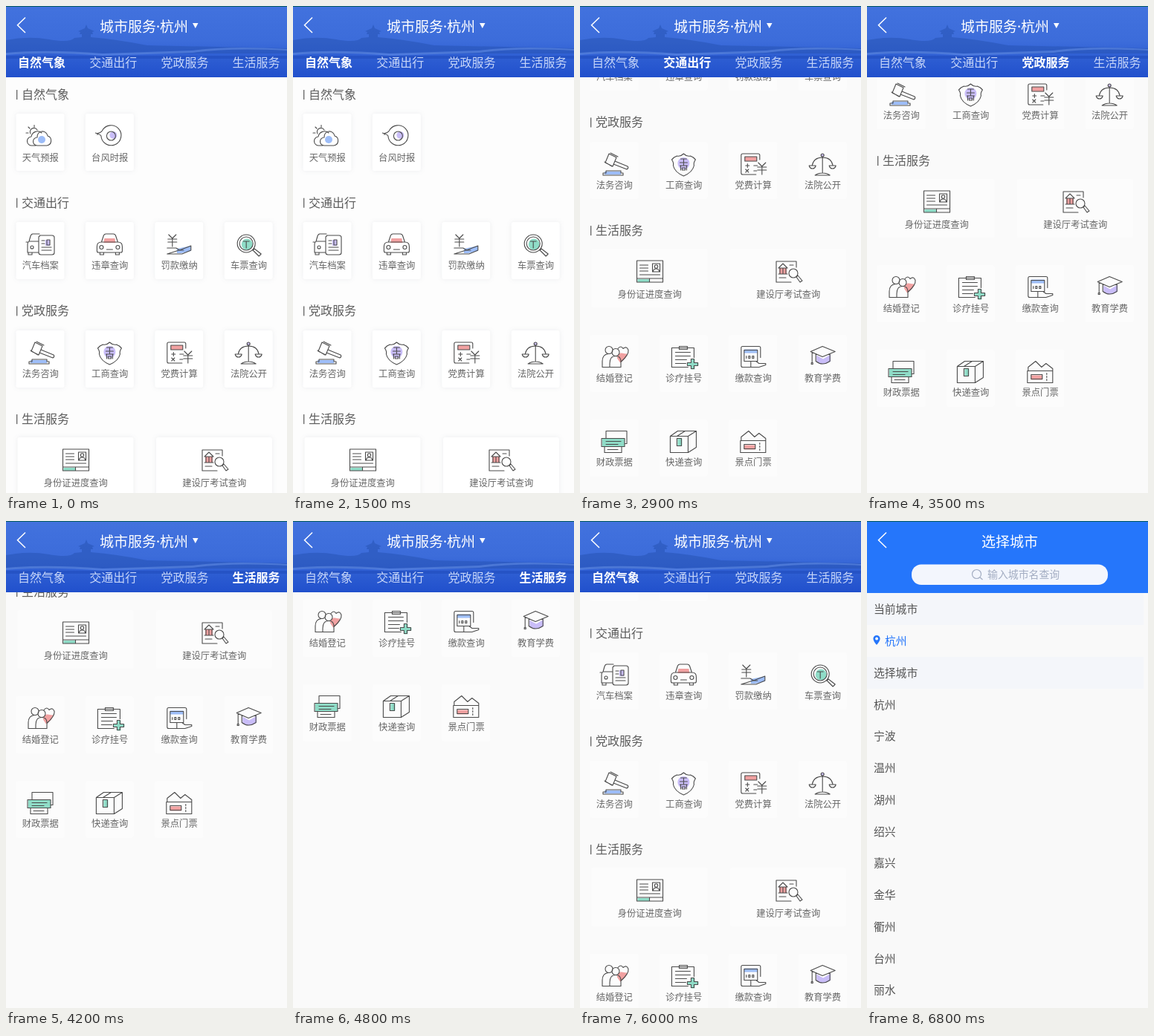
These frames come from a looping animation (378x656 px, 8 s). An HTML page:

```html
<!DOCTYPE html>
<html lang="zh-CN">
<head>
<meta charset="utf-8">
<title>城市服务</title>
<style>
html, body { margin: 0; width: 100%; height: 100%; overflow: hidden; background: #fafafa; }
svg { display: block; width: 378px; height: 656px; }
text { font-family: "Noto Sans CJK SC", "Noto Sans CJK", "Noto Sans", sans-serif; }
.title { font-family: "Noto Sans", "Noto Sans CJK SC", "Noto Sans CJK", sans-serif; }
.card { fill: #fff; filter: drop-shadow(0 0 3px rgba(70, 80, 100, .09)); }
.moved .card { fill: #fcfcfc; filter: none; }
.line { fill: none; stroke: #4b4b4b; stroke-width: 1.1; stroke-linejoin: round; stroke-linecap: round; }
.tab { fill: #c6d5f8; }
.tab.on { fill: #fff; font-weight: 700; }
</style>
</head>
<body>
<svg id="stage" viewBox="0 0 378 656">
  <defs>
    <linearGradient id="sky" x2="0" y2="1">
      <stop offset="0" stop-color="#4272de"/>
      <stop offset=".5" stop-color="#3c6cda"/>
      <stop offset=".7" stop-color="#2f5fd3"/>
      <stop offset="1" stop-color="#2150cc"/>
    </linearGradient>
  </defs>
  <g id="home">
    <rect id="paper" width="378" height="656"/>
    <g id="list"></g>
    <g id="banner">
      <rect width="378" height="96" fill="url(#sky)"/>
      <path fill="#2855b8" opacity=".6" d="M0 46Q30 40 58 45T92 43L102 42V38H99L100 35L97 34L106 30L108 25L110 30L119 34L116 35L117 38H114V42Q150 45 190 53L378 57V64H0z"/>
      <path fill="#6a93ea" opacity=".5" d="M0 63Q55 58 130 64L250 60Q300 53 378 58V60Q300 56 250 63L130 67Q55 61 0 66z"/>
      <path fill="#1c45b4" opacity=".45" d="M0 67H378V71H272L262 66L250 71H0z"/>
      <path fill="#fff" d="M251 23H258.500L254.800 30z"/>
    </g>
  </g>
  <g id="city">
    <rect width="378" height="656" fill="#f9f9f9"/>
    <rect width="378" height="97" fill="#2576fb"/>
    <rect x="60" y="58.500" width="264" height="27.500" rx="13" fill="#f3f6fd"/>
    <g fill="none" stroke="#a3adc2" stroke-width="1.2"><circle cx="147.500" cy="71.500" r="6"/><path d="M152 76L155.500 79"/></g>
    <path fill="#f4f6fa" d="M0 97H372V140H0zM0 183H372V226H0z"/>
    <path fill="#2576fb" fill-rule="evenodd" d="M13 154a4.600 4.600 0 0 1 4.600 4.600C17.600 162 13 167 13 167S8.400 162 8.400 158.600A4.600 4.600 0 0 1 13 154zM13 156.600a2 2 0 1 0 .1 0z"/>
  </g>
  <rect width="378" height="1" fill="#075d60"/>
</svg>
<script>
const $ = id => document.getElementById(id);
const NS = 'http://www.w3.org/2000/svg';
const el = (parent, tag, attrs) => {
  const node = document.createElementNS(NS, tag);
  for (const k in attrs) node.setAttribute(k, attrs[k]);
  return parent.appendChild(node);
};
// y is the optical middle of the line
const text = (parent, str, x, y, size, fill, anchor = 'start') => {
  const node = el(parent, 'text', { x, y: y + size * .37, 'font-size': size, 'text-anchor': anchor });
  if (fill) node.setAttribute('fill', fill);
  node.textContent = str;
  return node;
};
const ring = (x, y, r) => `M${x - r} ${y}a${r} ${r} 0 1 0 ${2 * r} 0a${r} ${r} 0 1 0 ${-2 * r} 0z`;
const yen = (x, y) => `M${x - 5} ${y - 8}l5 5 5-5M${x - 6} ${y - 2}h12M${x - 6} ${y + 2}h12M${x} ${y - 3}v11`;

const BLUE = '#9dbdf8', PURPLE = '#c9bdf8', RED = '#f1a1a1', TEAL = '#8fdcc7';

// label: [accent colour, accent path, line path], drawn around 0,0
const icons = {
  天气预报: [BLUE, ring(2, 4, 5),
    'M-13-4A5 5 0 1 1-4-9M-8-13v-2.500M-14-11l-2-2M-16-5h-3M-6 12H-11a6 6 0 0 1-1-12A8.500 8.500 0 0 1 2-5' +
    'M-4 12a5.500 5.500 0 0 1 0-11A7 7 0 0 1 10-1A6.700 6.700 0 0 1 9 12z'],
  台风时报: [PURPLE, ring(5, -2, 5),
    ring(2, -1, 6) + 'M-19-5Q-14-3-10-8A13.500 13.500 0 1 1-11.500-1Q-13-4-17-3'],
  汽车档案: [PURPLE, 'M7-6h6v8h-6z',
    'M0-12H16a3 3 0 0 1 3 3V11a3 3 0 0 1-3 3H1a3 3 0 0 1-3-3V-10zM2-5h4M2-1h4M2 4h13M2 8h13M9-6h4v7H9z' +
    'M-1-14h-9q-2 0-3 3l-2 7q-2 1-2 4v11H-2M-16 11v3h5v-3M-17-3h-2M-14-4H-3' + ring(-11, 4, 2)],
  违章查询: [RED, 'M-7-8H7L8-2H-8z',
    'M-11-3L-8-12q1-2 3-2H5q2 0 3 2L11-3M-15 11H15q2 0 2-2V3q0-6-6-6H-11q-6 0-6 6V9q0 2 2 2zM-13 11v3h5v-3M13 11v3H8v-3M-4 7H4' +
    ring(-11, 4, 2.5) + ring(11, 4, 2.5)],
  罚款缴纳: [BLUE, 'M-3 6L16 2V9L3 12H-3z',
    yen(-9, -5) + 'M-16 5H-4L1 8H6M3 7L16 2V8L4 13H-16z'],
  车票查询: [TEAL, ring(-2, 0, 7.5),
    ring(-3, -1, 12) + ring(-3, -1, 9) + 'M-7-4H1M-3-4V5M6 8L8 6L17 13L14 16z'],
  法务咨询: [BLUE, 'M-13 10H9V14H-13z',
    'M-7-14L3-9L-2 3L-12-2zM-5-15L5-10M-13-3L-3 3M1-4L18 3Q20 5 17 7L-1 0M-11 9H9V12H12V15H-15V12H-11z'],
  工商查询: [PURPLE, ring(0, -1, 8),
    'M0-14Q4-10 9-11L13-9L16-6Q13-2 14 2Q12 11 0 16Q-12 11-14 2Q-13-2-16-6L-13-9L-9-11Q-4-10 0-14z' +
    'M-4-7H4M0-7V-2M-5-2H5M0-1V1M-5 2H5M-4 2V8M4 2V8M-2 5H2V8H-2z'],
  党费计算: [RED, 'M-11-10H5V-4H-11z',
    'M9-6V-12Q9-14 7-14H-14Q-16-14-16-12V12Q-16 14-14 14H4M-11-10H5V-4H-11zM-10 2h5M-7.500-.5v5M1 2H6M-10 7l4 4M-6 7l-4 4M1 9H5' + yen(12, 6)],
  法院公开: [PURPLE, ring(0, -12, 2),
    ring(0, -12, 2) + 'M0-10V12M-10 15Q-6 12 0 12T10 15zM-14 2Q-12-9 0-9T14 2M-18 2H-9Q-10 6-13.500 6T-18 2zM9 2H18Q17 6 13.500 6T9 2z'],
  身份证进度查询: [TEAL, 'M-16 11H0V15H-16z',
    'M-17-14H18V15H-17zM-17 10H18M0 10V15M-13-8H-2M-13-4H-2M-13 0H-2M-13 5H14M4-10H14V1H4z' + ring(9, -6, 2.2) + 'M5 1Q5-3 9-3T13 1'],
  建设厅考试查询: [RED, 'M-12-4H-2V4H-12z',
    'M11-5V-13H-16V15H4M-13-4L-7-10L-1-4zM-11-4V4M-7-4V4M-3-4V4M-13 4H-1M-12 9H-3M2-8H7' + ring(7, 3, 6) + 'M11 8L13 6L19 13L16 15z'],
  结婚登记: [RED, 'M8 8L4 2Q5-6 10-5T17-4Q18 1 8 8z',
    ring(-7, -9, 5) + ring(2, -6, 5) + 'M-5 14H-16V6Q-16-3-8-4M-6 14V9Q-6-1 2-1T9 9V14zM5-11Q9-16 12-11Q17-15 19-9Q20-3 9 7'],
  诊疗挂号: [TEAL, 'M10 3h5v5h5v4h-5v5h-5v-5h-5v-4h5z',
    'M14 1V-12H-16V14H6M-6-14H5V-10H-6zM-11-6H9M-11-1H9M-11 4H4M-11 9H3M10 3h4v5h5v4h-5v4h-4v-4h-5v-4h5z'],
  缴款查询: [BLUE, 'M-12-10H6V-5H-12z',
    'M10 1V-12Q10-14 8-14H-14Q-16-14-16-12V12Q-16 14-14 14H-3M-12-9H6V6H-12zM-9-1V2M-6-1H-4V2H-6zM-1-1H1V2H-1zM-3 6H4L8 9H17V11L8 14H-3z'],
  教育学费: [PURPLE, 'M-8-2L1 3L11-3V6Q0 13-8 7z',
    'M-16-7L0-14L17-7L0 0zM-9-4V6Q0 13 10 6V-4M-14-6V8M-15 8h2v2h-2z'],
  财政票据: [TEAL, 'M-16-4H14V7H-16z',
    'M-11-4V-14H17V3H14M-17-4H14V7H-17zM-13 7V15H10V7M-11 0H9M-11 4H5M-9 11H5'],
  快递查询: [TEAL, 'M-8-4H-2V6H-8z',
    'M-18-7H6V15H-18zM-18-7L-8-14H17V8L6 15M6-7L17-14M-9-7L2-14M-9-4H-3V6H-9z'],
  景点门票: [RED, 'M-12 5H3V11H-12z',
    'M-16-1V-6L-6-14L2-6L8-11L17-4V-1M-17-1H17V15H-17zM-12 4H3V10H-12zM9 2V4M9 6V8M9 10V12']
};

// [card top, height, icon y, label y, wide, labels]
const rows = [
  [145, 77, 176, 204.5, 0, '天气预报 台风时报'],
  [291, 77, 321, 349.5, 0, '汽车档案 违章查询 罚款缴纳 车票查询'],
  [437, 77, 467, 495.5, 0, '法务咨询 工商查询 党费计算 法院公开'],
  [581, 79, 611, 642.5, 1, '身份证进度查询 建设厅考试查询'],
  [697, 77, 726.5, 755.5, 0, '结婚登记 诊疗挂号 缴款查询 教育学费'],
  [811, 77, 840.5, 868.5, 0, '财政票据 快递查询 景点门票']
];
const sections = ['自然气象', '交通出行', '党政服务', '生活服务'];
const list = $('list'), banner = $('banner'), city = $('city');

sections.forEach((name, i) => {
  const y = 119 + i * 145.7;
  el(list, 'rect', { x: 14, y: y - 6, width: 1.3, height: 13, fill: '#666' });
  text(list, name, 21, y, 16, '#5c5c5c');
});
for (const [top, height, iconY, labelY, wide, labels] of rows) {
  labels.split(' ').forEach((label, i) => {
    const x = wide ? 93.5 + i * 186.5 : 46 + i * 93.4;
    const width = wide ? 156 : 65;
    el(list, 'rect', { class: 'card', x: x - width / 2, y: top, width, height, rx: 3 });
    const [fill, accent, line] = icons[label];
    const g = el(list, 'g', { transform: `translate(${x} ${iconY})` });
    el(g, 'path', { d: accent, fill });
    el(g, 'path', { d: line, class: 'line' });
    text(list, label, x + .3, labelY, 12.3, '#666', 'middle');
  });
}

text(banner, '城市服务·杭州', 126, 27.5, 19, '#fff').setAttribute('class', 'title');
const tabs = sections.map((name, i) => {
  const tab = text(banner, name, 16 + i * 96.2, 76, 16);
  tab.setAttribute('class', 'tab');
  return tab;
});
text(city, '选择城市', 192, 27.5, 19, '#fff', 'middle');
text(city, '输入城市名查询', 162, 72, 13.9, '#a3adc2');
'当前城市 杭州 选择城市 杭州 宁波 温州 湖州 绍兴 嘉兴 金华 衢州 台州 丽水'.split(' ').forEach((name, i) =>
  text(city, name, i === 1 ? 24 : 9, 119 + i * 42.75, 14.8, i === 1 ? '#2576fb' : '#555'));
for (const page of [banner, city])
  el(page, 'path', { d: 'M26 15.500L15.500 25.700L26 36', fill: 'none', stroke: '#fff', 'stroke-width': 1.5 });

// Swipes: start time, then the scroll offset for each 100 ms step
const STEP = 100, LOOP = 8000, OPEN = 6700;
const swipes = [
  [1500, 0, 95, 166],
  [2500, 176, 205, 231, 247, 254],
  [3300, 264, 305, 348, 380, 399, 406],
  [4200, 461, 530, 569, 584],
  [4700, 589, 591],
  [5000, 570, 480, 365, 285, 270, 264],
  [5700, 238, 178, 131, 114]
];
const snaps = [0, 146, 292, 437];

function scrollAt(t) {
  let y = 0;
  for (const [start, ...steps] of swipes) {
    if (t < start) break;
    y = steps[Math.min(steps.length - 1, Math.floor((t - start) / STEP))];
  }
  return y;
}

function draw(t) {
  const y = scrollAt(t);
  const active = snaps.filter(s => y >= s).length - 1;
  list.setAttribute('transform', `translate(0 ${-y})`);
  $('home').setAttribute('class', y ? 'moved' : '');
  $('paper').setAttribute('fill', y ? '#fafafa' : '#fdfdfd');
  tabs.forEach((tab, i) => tab.classList.toggle('on', i === active));
  city.setAttribute('visibility', t < OPEN ? 'hidden' : 'visible');
  city.setAttribute('transform', `translate(${t < OPEN + STEP ? 120 : 0} 0)`);
}

const begin = performance.now();
function tick() {
  draw((performance.now() - begin) % LOOP);
  requestAnimationFrame(tick);
}
tick();
</script>
</body>
</html>
```
